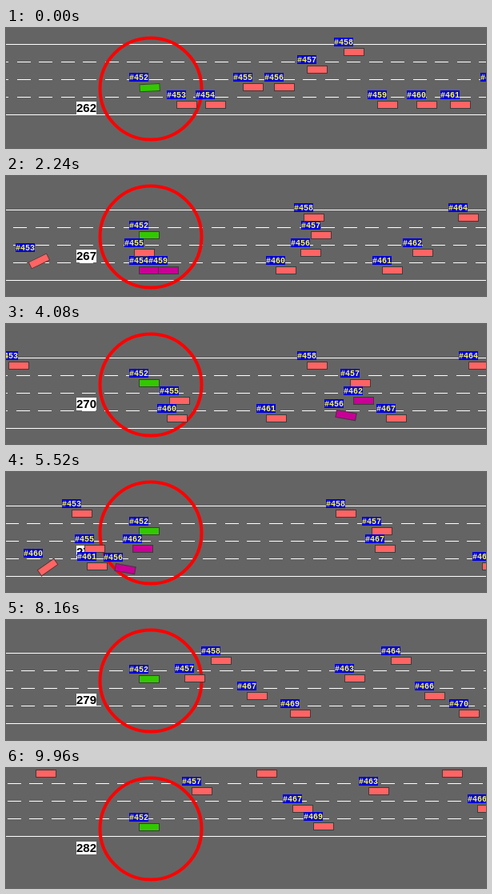
An HTML page with a canvas for the animation above (10000 ms loop, 600 by 150 pixels).

```html
<!DOCTYPE html>
<html lang="en">
<head>
<meta charset="utf-8">
<title>Highway traffic</title>
<style>
  html, body { margin: 0; width: 100%; height: 100%; overflow: hidden; background: #646464; }
  canvas { display: block; }
</style>
</head>
<body>
<canvas id="road" width="600" height="150"></canvas>
<script>
const ctx = document.getElementById('road').getContext('2d');
const LOOP = 10000, STEP = 40;
const LANE = 22, CAR_W = 26, CAR_H = 10;
const STRIPE_GAP = 27.5, STRIPE = 17;
const CRUISE = 225; // px per second
const RED = '#ff6464', GREEN = '#32c800', PURPLE = '#c80096';

// Smooth step from 0 to 1 between two times.
function ease(t, from, to) {
  const u = Math.min(1, Math.max(0, (t - from) / (to - from)));
  return u * u * (3 - 2 * u);
}

// Rise from 0 to 1 and back between two times.
function bump(t, from, to) {
  const u = Math.min(1, Math.max(0, (t - from) / (to - from)));
  return 4 * u * (1 - u);
}

// Critically damped move from 0 to 1.
const settle = (t, rate) => t <= 0 ? 0 : 1 - (1 + rate * t) * Math.exp(-rate * t);

// Distance lost by a car that brakes from a given time on.
const brake = (t, from, force) => force * Math.max(0, t - from) ** 2;

// Catching up with a car ahead, ever more slowly.
const closing = (t, gap, extra) => gap + extra * Math.exp(-0.3 * t);

// Place of the traffic stream relative to the followed car.
const stream = t => 435 - 51 * ease(t, 0, 2.4) + 52 * ease(t, 3.7, 5.6)
  - 168 * ease(t, 5, 8.3) + 61 * ease(t, 8.3, 10.2);

// Top edge of the road: one lane change to the left, two to the right.
const roadTop = t => 20 - 0.07 * t
  + LANE * (settle(t + 0.06, 3) - settle(t - 8.2, 6) - settle(t - 8.75, 6));

// The front cars of the two collisions; the car behind runs into them.
const wreckA = t => 42 - 80 * t - brake(t, 1.3, 50);
const wreckB = t => 183 - 21 * t - brake(t, 3.3, 65);

// gap: distance to the stream; lane and turn: constants or functions of time
const cars = [
  { id: 453, gap: t => -209 - 165 * ease(t, 0, 3) + 62 * ease(t, 3.9, 6.4) + 36 * ease(t, 6.2, 9.5),
    lane: t => 3 - 3 * ease(t, 1.6, 3.6), turn: t => -30 * bump(t, 1.6, 3.6) },
  { id: 454, gap: t => Math.min(67 * t - 173, wreckA(t) - 24), lane: 3, crash: 1.3 },
  { id: 455, gap: t => -126 - 86 * ease(t, 0, 2.2) + 40 * ease(t, 2.4, 4) - brake(t, 4.2, 81), lane: 2 },
  { id: 456, gap: t => Math.min(37 * t - 87, wreckB(t) - 24), crash: 3.8,
    lane: t => 2 + 0.73 * ease(t, 3.2, 4.1) + 0.32 * ease(t, 4.1, 5.5),
    turn: t => 10 * ease(t, 3.2, 3.9) },
  { id: 457, gap: t => -46 + 100 * ease(t, 0, 4.2) - 142 * ease(t, 4.6, 10.8), lane: 1 },
  { id: 458, gap: t => 0, lane: 0 },
  { id: 459, gap: wreckA, lane: 3, crash: 1.3 },
  { id: 460, gap: t => 91 - 56 * t - brake(t, 2.7, 20),
    lane: t => 3 - 0.17 * ease(t, 4.7, 5.5), turn: t => -35 * ease(t, 4.7, 5.5) },
  { id: 461, gap: t => 133 - 15 * t - brake(t, 2.05, 30), lane: 3 },
  { id: 462, gap: wreckB, lane: 2, crash: 3.8 },
  { id: 463, gap: t => closing(t, 100, 778), lane: 1 },
  { id: 464, gap: t => 192 + 41 * ease(t, 1, 11), lane: 0 },
  { id: 466, gap: t => 230 + 4.6 * t, lane: 2 },
  { id: 467, gap: t => 45 + 54 * Math.exp(1.8 * (4.08 - t)),
    lane: t => 3 - ease(t, 4.2, 5.4), turn: t => -7 * bump(t, 4.2, 5.4) },
  { id: 469, gap: t => closing(t, 30, 802), lane: 3 },
  { id: 470, gap: t => 310, lane: 3 }
];

const at = (value, t) => typeof value === 'function' ? value(t) : value || 0;

function drawRoad(top, travel) {
  ctx.fillStyle = '#646464';
  ctx.fillRect(0, 0, 600, 150);
  ctx.fillStyle = '#fff';
  const start = -(travel % STRIPE_GAP) - STRIPE_GAP;
  for (let line = 0; line <= 4; line++) {
    const y = top + line * LANE;
    if (line % 4 === 0) ctx.fillRect(0, y, 600, 1);
    else for (let x = start; x < 600; x += STRIPE_GAP) ctx.fillRect(Math.round(x), y, STRIPE, 1);
  }
}

function drawCar(id, x, y, degrees, color) {
  const left = Math.round(x - 13), top = Math.round(y - 5.5);
  const angle = degrees * Math.PI / 180;
  // A turned car sits in a larger box that keeps its top left corner.
  const grow = CAR_W / 2 * (Math.abs(Math.cos(angle)) + Math.abs(Math.sin(angle)) - 1);
  ctx.save();
  ctx.translate(left + CAR_W / 2 + grow, top + CAR_H / 2 + grow);
  ctx.rotate(angle);
  ctx.fillStyle = color;
  ctx.fillRect(-CAR_W / 2, -CAR_H / 2, CAR_W, CAR_H);
  ctx.strokeStyle = '#3c3c3c';
  ctx.lineWidth = 1;
  ctx.strokeRect(-CAR_W / 2 + 0.5, -CAR_H / 2 + 0.5, CAR_W - 1, CAR_H - 1);
  ctx.restore();

  ctx.fillStyle = '#0000dc';
  ctx.fillRect(left - 12, top - 13, 24, 11);
  ctx.fillStyle = '#ffff40';
  ctx.font = 'bold 10px "Liberation Mono", monospace';
  ctx.fillText('#' + id, left - 12, top - 4);
}

function drawEgo(t) {
  ctx.strokeStyle = '#f00';
  ctx.lineWidth = 4;
  ctx.beginPath();
  ctx.arc(181, 76, 63.5, 0, 2 * Math.PI);
  ctx.stroke();

  ctx.fillStyle = '#fff';
  ctx.fillRect(88, 92, 25, 16);
  ctx.fillStyle = '#000';
  ctx.font = 'bold 15px "Liberation Sans", sans-serif';
  ctx.fillText(Math.floor(262.7 + 2 * t), 88, 105);

  const drift = (roadTop(t + 0.01) - roadTop(t)) / 0.01;
  const heading = -Math.atan(drift / 200) * 180 / Math.PI;
  drawCar(452, 179, 74.5, Math.abs(heading) < 2 ? 0 : heading, GREEN);
}

function draw(t) {
  const top = Math.round(roadTop(t)), flow = stream(t);
  drawRoad(top, CRUISE * t + stream(0) - flow + STRIPE_GAP / 2);
  drawEgo(t);
  for (const car of cars) {
    const x = flow + car.gap(t);
    if (x < -30 || x > 640) continue;
    const y = top + 10.5 + LANE * at(car.lane, t);
    drawCar(car.id, x, y, at(car.turn, t), t >= car.crash ? PURPLE : RED);
  }
}

let origin;
function tick(now) {
  origin ??= now;
  draw(Math.floor((now - origin) % LOOP / STEP) * STEP / 1000);
  requestAnimationFrame(tick);
}
draw(0);
requestAnimationFrame(tick);
</script>
</body>
</html>
```
